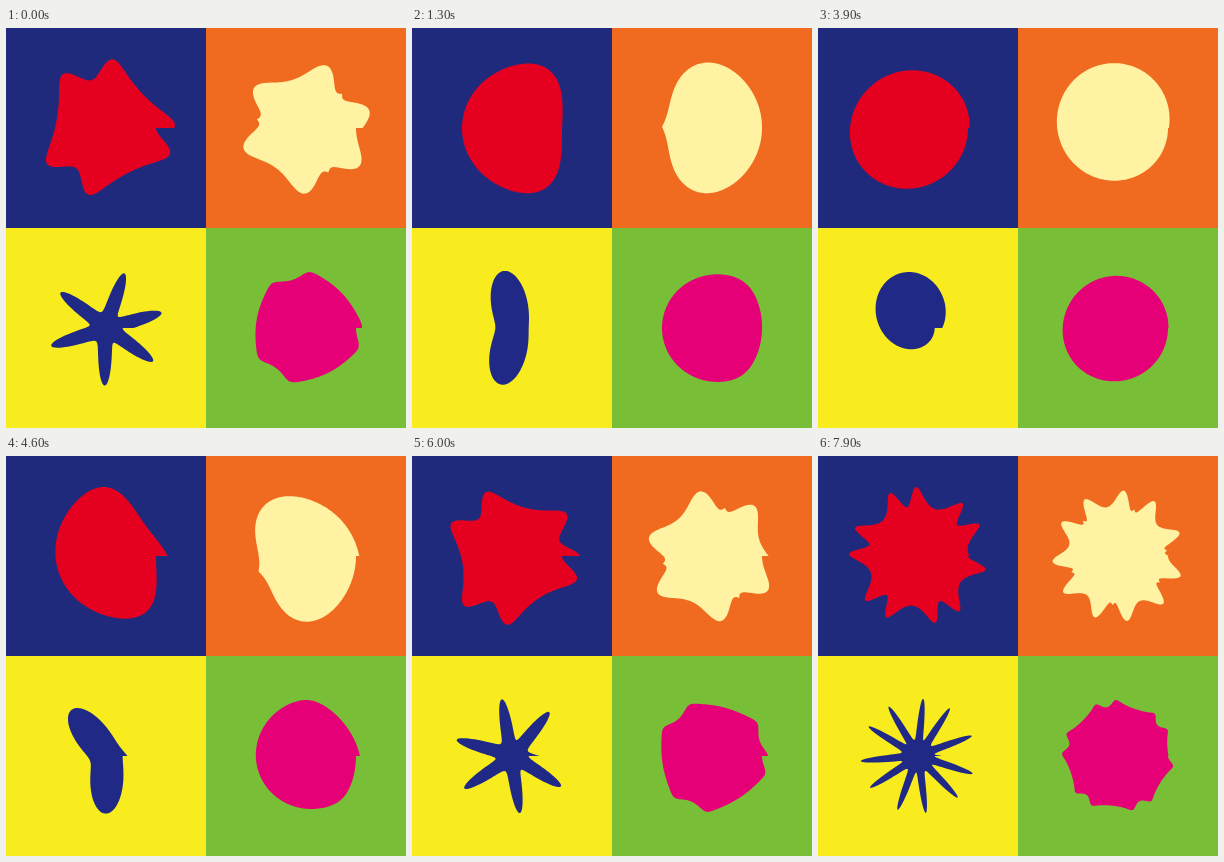
These frames come from a looping animation (400 by 400 pixels, 8000 ms). An HTML page with a canvas:

```html
<!DOCTYPE html>
<html lang="en">
<head>
<meta charset="utf-8">
<title>Supershapes</title>
<style>
  html, body { margin: 0; width: 100%; height: 100%; overflow: hidden; }
  canvas { display: block; width: 400px; height: 400px; }
</style>
</head>
<body>
<canvas id="stage" width="400" height="400"></canvas>
<script>
const ctx = document.getElementById('stage').getContext('2d');
const LOOP = 8000, STEP = 100, PERIOD = 12000, REST = 2900, MAX_M = 12;
const CELL = 200, POINTS = 360;

// Each cell holds one superformula shape with exponents n = [n1, n2, n3].
const cells = [
  { x: 0,   y: 0,   back: '#1f2a7c', fill: '#e6001f', size: 50,     n: [3, 14, 2] },
  { x: 200, y: 0,   back: '#f06a20', fill: '#fff2a2', size: 50,     n: [1, 1, 8] },
  { x: 0,   y: 200, back: '#f8ec1e', fill: '#202a86', size: 50 / 3, n: [1, 4, 8] },
  { x: 200, y: 200, back: '#78be36', fill: '#e60078', size: 50,     n: [15, 20, 3] }
];

function radius(theta, m, [n1, n2, n3]) {
  const phi = m * theta / 4;
  const sum = Math.abs(Math.cos(phi)) ** n2 + Math.abs(Math.sin(phi)) ** n3;
  return sum ** (-1 / n1);
}

function drawCell({ x, y, back, fill, size, n }, m) {
  ctx.fillStyle = back;
  ctx.fillRect(x, y, CELL, CELL);
  ctx.beginPath();
  for (let i = 0; i <= POINTS; i++) {
    const theta = i / POINTS * 2 * Math.PI;
    const r = size * radius(theta, m, n);
    ctx.lineTo(x + CELL / 2 + r * Math.cos(theta), y + CELL / 2 + r * Math.sin(theta));
  }
  ctx.closePath();
  ctx.fillStyle = fill;
  ctx.fill();
}

function symmetry(t) {
  return MAX_M / 2 * (1 - Math.cos(2 * Math.PI * (t - REST) / PERIOD));
}

const start = performance.now();
let shown = -1;

function tick() {
  const elapsed = Math.max(0, performance.now() - start) % LOOP;
  const t = Math.floor(elapsed / STEP) * STEP;
  if (t !== shown) {
    shown = t;
    cells.forEach(cell => drawCell(cell, symmetry(t)));
  }
  requestAnimationFrame(tick);
}
tick();
</script>
</body>
</html>
```
